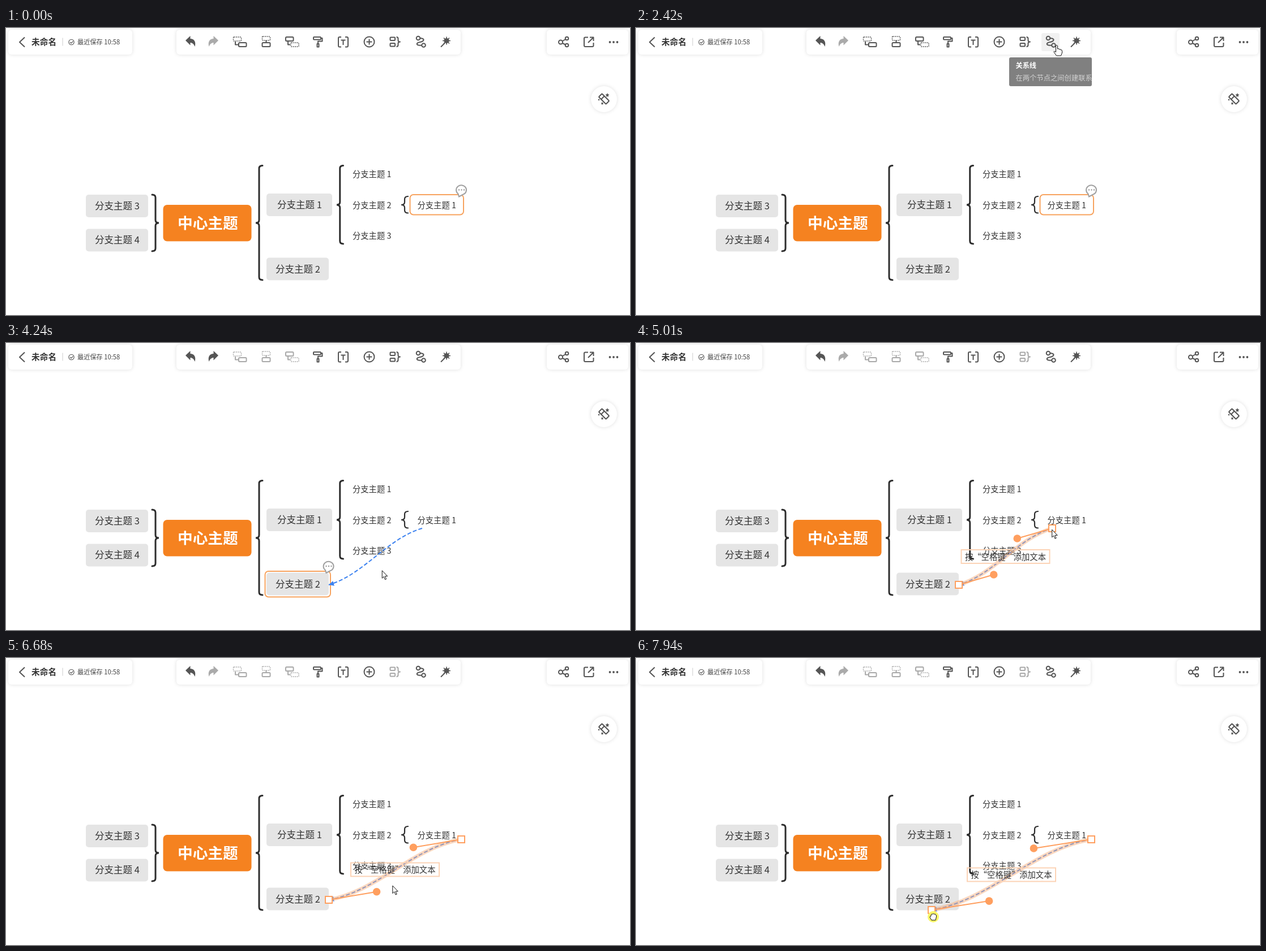
These frames come from a looping animation (1102x508 px, 8 s). An HTML page:

```html
<!DOCTYPE html>
<html lang="zh-CN">
<head>
<meta charset="utf-8">
<style>
  html, body { margin: 0; height: 100%; overflow: hidden; background: #fff; }
  svg { display: block; width: 1102px; height: 508px; font-family: "Noto Sans CJK SC", "Noto Sans CJK", sans-serif; }
  .panel { fill: #fff; filter: drop-shadow(0 0 3px rgba(0,0,0,.13)); }
  .icon { fill: none; stroke: #555; stroke-width: 2; stroke-linejoin: round; }
  .solid, .icon .solid { fill: #555; stroke: none; }
  .icon .dash { stroke-width: 1.4; stroke-dasharray: 2 1.4; }
  .off { opacity: .5; }
  .node { fill: #e5e5e5; }
  .label { font-size: 16.5px; fill: #333; }
  .leaf { font-size: 14.3px; fill: #333; }
  .brace { fill: none; stroke: #2d2d2d; stroke-width: 3; stroke-linecap: round; }
  .outline { fill: none; stroke: #f7a35f; stroke-width: 2; }
  .badge { fill: #fff; stroke: #a0a0a0; stroke-width: 2; }
  .pointer { fill: #fff; stroke: #111; stroke-linejoin: round; }
  .arm { stroke: #ff9f5f; stroke-width: 2; }
  .grip { fill: #ff9f5f; }
  .end { fill: #fff; stroke: #ff9f5f; stroke-width: 2; }
</style>
</head>
<body>
<svg viewBox="0 0 1102 508">
  <defs>
    <g id="badge">
      <path class="badge" d="M-6 7L-4.500 12L2 8.500A9 8.500 0 1 0 -6 7Z"/>
      <path d="M-4.500 0h.01M0 0h.01M4.500 0h.01" stroke="#999" stroke-width="2.400" stroke-linecap="round"/>
    </g>
    <path id="undo" class="solid" d="M317 22L325.500 14V19C332.500 19 336 25 333.500 33C331.500 28 329 26 325.500 26V30.500Z"/>
  </defs>

  <rect class="panel" x="4" y="3" width="219" height="44" rx="6"/>
  <rect class="panel" x="301" y="3" width="502" height="44" rx="6"/>
  <rect class="panel" x="955" y="3" width="144" height="44" rx="6"/>
  <circle class="panel" cx="1056" cy="126" r="23"/>
  <rect id="hover" y="9" width="32" height="32" rx="3" fill="#f1f1f1"/>

  <path class="icon" d="M33 16.500L24 25L33 33.500"/>
  <text x="45" y="29.500" font-size="14.700" font-weight="700" fill="#333">未命名</text>
  <path d="M100 17.500V31.500" stroke="#ccc"/>
  <g class="icon" style="stroke-width:1.100"><circle cx="115.500" cy="25" r="4.700"/><path d="M113 25l2 2l3.500-3.500"/></g>
  <text x="126" y="28.800" font-size="11.200" fill="#444">最近保存 10:58</text>

  <use href="#undo"/>
  <use id="redo" href="#undo" transform="translate(692) scale(-1 1)"/>
  <g id="insert" class="icon">
    <rect class="dash" x="401.500" y="16" width="14" height="7" rx="1"/>
    <rect x="411" y="26" width="13.500" height="7" rx="1.500"/><path d="M405 24V29.500H410"/>
    <rect class="dash" x="452.500" y="15" width="14" height="7" rx="1"/>
    <rect x="452.500" y="26" width="14" height="7" rx="1.500"/><path d="M459.500 22V26"/>
    <rect x="494" y="16" width="13.500" height="7" rx="1.500"/><path d="M498 24V29.500H502"/>
    <rect class="dash" x="503" y="26" width="14" height="7" rx="1"/>
  </g>
  <g class="icon">
    <rect x="543" y="16" width="13" height="4.500" rx="1"/><path d="M556 18H558.500V23.500H551V27"/><rect x="549.500" y="28" width="3" height="5.500"/>
    <path d="M592 16H589Q587 16 587 18V31Q587 33.500 589 33.500H592M599 16H602Q604 16 604 18V31Q604 33.500 602 33.500H599M591.500 21.500H599.500M595.500 21.500V30"/>
    <circle cx="641.500" cy="24.500" r="9"/><path d="M636.500 24.500h10M641.500 19.500v10"/>
  </g>
  <g id="group" class="icon">
    <rect x="678.500" y="16.500" width="8.500" height="5.500" rx="1"/><rect x="678.500" y="27" width="8.500" height="5.500" rx="1"/>
    <path d="M689.500 16Q692.500 16 692.500 19V22Q692.500 24.500 696 24.500Q692.500 24.500 692.500 27V30Q692.500 33 689.500 33"/>
  </g>
  <g class="icon">
    <circle cx="728" cy="18" r="3.300"/><circle cx="737.500" cy="30.500" r="3.300"/>
    <path d="M731.500 18C742 19 737 24 731 25C723 26.500 724 31.500 734 30.500"/>
    <path d="M768 33.500L775 26.500"/><circle class="solid" cx="778" cy="22.500" r="4.600"/>
    <path stroke-width="1.600" d="M778 15.500v14M771 22.500h14M773 17.500l10 10M783 17.500l-10 10"/>
    <circle cx="979.500" cy="25" r="3.500"/><circle cx="990.500" cy="18.500" r="2.800"/><circle cx="990.500" cy="30.500" r="2.800"/><path d="M983 23l5-3M983 27l5 2.500"/>
    <path d="M1028 16.500H1023Q1021 16.500 1021 18.500V31Q1021 33 1023 33H1035.500Q1037.500 33 1037.500 31V26M1031 16.500H1037.500V23M1037.500 16.500L1028 26"/>
    <circle class="solid" cx="1066.500" cy="25" r="1.900"/><circle class="solid" cx="1073" cy="25" r="1.900"/><circle class="solid" cx="1079.500" cy="25" r="1.900"/>
    <g transform="translate(1056 125.500) rotate(45)"><rect x="-9" y="-4" width="18" height="8" rx="1"/><path d="M-3-4V4"/></g>
    <path class="solid" d="M1062 115l1 2.300l2.500.4l-1.900 1.700l.4 2.500l-2-1.200l-2.200 1.200l.5-2.500l-1.800-1.700l2.500-.4ZM1053 131l.8 1.500l1.700.3l-1.300 1.200l.3 1.700l-1.500-.8l-1.500.8l.3-1.700l-1.300-1.200l1.700-.3Z"/>
    <circle class="solid" cx="1047" cy="127" r="1.300"/>
  </g>

  <g id="map">
    <rect class="node" x="141" y="295" width="110" height="40" rx="5"/>
    <rect class="node" x="141" y="355.500" width="110" height="40" rx="5"/>
    <rect class="node" x="460" y="293" width="116" height="40" rx="5"/>
    <rect class="node" x="460" y="406.500" width="110" height="40" rx="5"/>
    <rect x="277.500" y="313" width="156" height="64.500" rx="7" fill="#f58220"/>
    <text x="303" y="354.500" font-size="26.700" font-weight="700" fill="#fff">中心主题</text>
    <g class="label"><text x="157" y="321">分支主题 3</text><text x="157" y="381">分支主题 4</text><text x="479" y="318.500">分支主题 1</text><text x="476" y="432.500">分支主题 2</text></g>
    <g class="leaf"><text x="612" y="263.500">分支主题 1</text><text x="612" y="318.500">分支主题 2</text><text x="612" y="372.500">分支主题 3</text><text x="726.500" y="318.500">分支主题 1</text></g>
  </g>

  <g id="leafPick"><rect class="outline" x="713.500" y="295" width="94.500" height="35.500" rx="6"/><use href="#badge" x="804.500" y="286.500"/></g>
  <g id="nodePick"><rect class="outline" x="457.500" y="404" width="115.500" height="45.500" rx="6"/><use href="#badge" x="570" y="395"/></g>

  <g id="link" fill="none">
    <path id="dashes" stroke="#3c82f0" stroke-width="2" stroke-dasharray="7 3.500"/>
    <path id="tip" fill="#3c82f0" d="M0 0L-9-4.500V4.500Z"/>
    <path id="glow" stroke="#f9a871" stroke-opacity=".45" stroke-width="7"/>
  </g>
  <g id="edit">
    <g id="hint"><rect x="-78" y="-12" width="156" height="24" fill="none" stroke="#fcd3b6" stroke-width="2"/><text class="leaf" x="-71.500" y="5.500">按“空格键”添加文本</text></g>
    <line class="arm" id="armA"/><line class="arm" id="armB"/>
    <circle class="grip" id="gripA" r="6.800"/><circle class="grip" id="gripB" r="6.800"/>
    <rect class="end" id="endA" x="-6" y="-6" width="12" height="12"/><rect class="end" id="endB" x="-6" y="-6" width="12" height="12"/>
  </g>

  <g id="tooltip">
    <rect id="tipBox" y="52" height="51" rx="3" fill="#808080"/>
    <text id="tipTitle" x="11.500" y="71" font-size="12.200" font-weight="700" fill="#fff"></text>
    <text id="tipText" x="11.500" y="92.500" font-size="12.300" font-weight="500" fill="#d2d2d2"></text>
  </g>

  <g id="cursor">
    <circle id="press" r="10" fill="#fbf668"/>
    <path id="arrow" class="pointer" d="M0 0V13.500L3 10.700L5.300 16L7.400 15L5.200 10H9.500Z"/>
    <path id="hand" class="pointer" d="M-1.500 1.500Q0-1 1.500 1.500V7Q4 5.500 4.500 8Q7 6.500 7.200 9Q9.500 8 9.500 10.500V14L7.500 19H-.5L-5 12.500Q-5.500 10-1.500 12.500Z"/>
    <path id="grab" class="pointer" d="M-4-3Q-3-6-1.500-4.500Q0-6.500 1.500-4.500Q3.500-6 4-3.500Q6-3.500 5.500 0L4 6H-3L-6 1Q-6-1.500-4-1Z"/>
  </g>
</svg>
<script>
const $ = id => document.getElementById(id);
const set = (el, attrs) => { for (const k in attrs) el.setAttribute(k, attrs[k]); };
const show = (id, on) => $(id).style.display = on ? '' : 'none';
const place = (id, [x, y]) => set($(id), { transform: `translate(${x} ${y})` });
const DURATION = 8000;

// Curly brace whose spine lies between its ends at x and its tip at tipX
function brace(x, top, bottom, tipX, tipY, width = 3) {
  const s = (x + tipX) / 2, q = 5;
  const el = document.createElementNS('http://www.w3.org/2000/svg', 'path');
  set(el, { class: 'brace', style: `stroke-width:${width}`, d:
    `M${x} ${top}Q${s} ${top} ${s} ${top + q}V${tipY - q}Q${s} ${tipY} ${tipX} ${tipY}` +
    `Q${s} ${tipY} ${s} ${tipY + q}V${bottom - q}Q${s} ${bottom} ${x} ${bottom}` });
  $('map').append(el);
}
brace(258, 295, 395, 270, 345);
brace(453, 243.5, 446, 441, 345);
brace(595.5, 243.5, 382, 584, 313);
brace(710, 298, 327.5, 698, 313, 2.2);

const pointerKeys = [
  [70, 1053, 488], [450, 905, 342], [830, 788, 220], [900, 785, 232], [1150, 767, 303],
  [1400, 762, 190], [1660, 763, 58], [1730, 766, 47], [1800, 772, 32], [2060, 770, 29],
  [2130, 750, 30], [2420, 743, 30], [2560, 743, 30], [2950, 680, 220], [3340, 583, 426],
  [3410, 566, 429], [3960, 565, 429], [4240, 664, 403], [4590, 742, 335], [4730, 734, 330],
  [5550, 736, 331], [5830, 776, 341], [6250, 818, 336], [6390, 819, 330], [6680, 683, 403],
  [7170, 577, 426], [7240, 577, 430], [7560, 545, 463], [7940, 525, 458]
];
const startKeys = [[5550, 735, 328], [5830, 763, 328], [6040, 796, 328], [6250, 804, 321]];
const endKeys = [[7240, 570, 428], [7400, 567, 446], [7800, 522, 446]];
const presses = [[2560, 2700], [3410, 3550], [4800, 4940], [5350, 6320], [7240, DURATION]];

function at(keys, t) {
  const i = keys.findIndex(k => k[0] > t);
  if (i < 0) return keys[keys.length - 1].slice(1);
  if (i === 0) return keys[0].slice(1);
  const [t0, x0, y0] = keys[i - 1], [t1, x1, y1] = keys[i];
  const p = (t - t0) / (t1 - t0);
  return [x0 + (x1 - x0) * p, y0 + (y1 - y0) * p];
}

// Where the ray from the leaf's centre towards a point leaves the leaf
function leafEdge([x, y]) {
  const dx = x - 761, dy = y - 313;
  const p = Math.min(43 / Math.abs(dx || 1), 15 / Math.abs(dy || 1));
  return [761 + dx * p, 313 + dy * p];
}

// Control point: a third of the way to the other end, turned by 15 degrees
function control([x, y], [tx, ty]) {
  const angle = Math.atan2(ty - y, tx - x) + Math.PI / 12;
  const reach = Math.hypot(tx - x, ty - y) / 3;
  return [x + reach * Math.cos(angle), y + reach * Math.sin(angle)];
}

function drawLink(a, b) {
  const ca = control(a, b), cb = control(b, a);
  const d = `M${a}C${ca} ${cb} ${b}`;
  set($('dashes'), { d });
  set($('glow'), { d });
  const heading = Math.atan2(b[1] - cb[1], b[0] - cb[0]) * 180 / Math.PI;
  set($('tip'), { transform: `translate(${b}) rotate(${heading})` });
  for (const [name, end, grip] of [['A', a, ca], ['B', b, cb]]) {
    place('end' + name, end);
    place('grip' + name, grip);
    set($('arm' + name), { x1: end[0], y1: end[1], x2: grip[0], y2: grip[1] });
  }
  place('hint', [(a[0] + b[0]) / 2, (a[1] + b[1]) / 2]);
}

function drawTooltip(x, width, title, text) {
  place('tooltip', [x, 0]);
  set($('tipBox'), { width });
  $('tipTitle').textContent = title;
  $('tipText').textContent = text;
}

function render(t) {
  const within = (from, to) => t >= from && t < to;
  const linked = t >= 3480, editing = t >= 4870, dragging = within(2630, 3480);
  const pointer = at(pointerKeys, t);

  const onWand = within(1800, 2130), hovering = within(1800, 2560);
  show('hover', hovering);
  show('tooltip', hovering);
  set($('hover'), { x: onWand ? 761 : 716 });
  if (onWand) drawTooltip(693, 168, '智能美化', '一键优化导图的样式布局。');
  else drawTooltip(659, 146, '关系线', '在两个节点之间创建联系');

  $('redo').classList.toggle('off', !linked || editing);
  $('insert').classList.toggle('off', linked);
  $('group').classList.toggle('off', editing);
  show('leafPick', !linked);
  show('nodePick', linked && !editing);

  show('link', linked || dragging);
  show('glow', editing);
  show('edit', editing);
  if (dragging) drawLink(leafEdge(pointer), pointer);
  else drawLink(at(startKeys, t), at(endKeys, t));

  show('cursor', t >= 70);
  place('cursor', pointer);
  show('press', presses.some(([from, to]) => within(from, to)));
  const grabbing = t >= 7240, pointing = within(1800, 2700);
  show('hand', pointing);
  show('grab', grabbing);
  show('arrow', !pointing && !grabbing);
}

const begin = performance.now();
(function tick() {
  render((performance.now() - begin) % DURATION);
  requestAnimationFrame(tick);
})();
</script>
</body>
</html>
```
